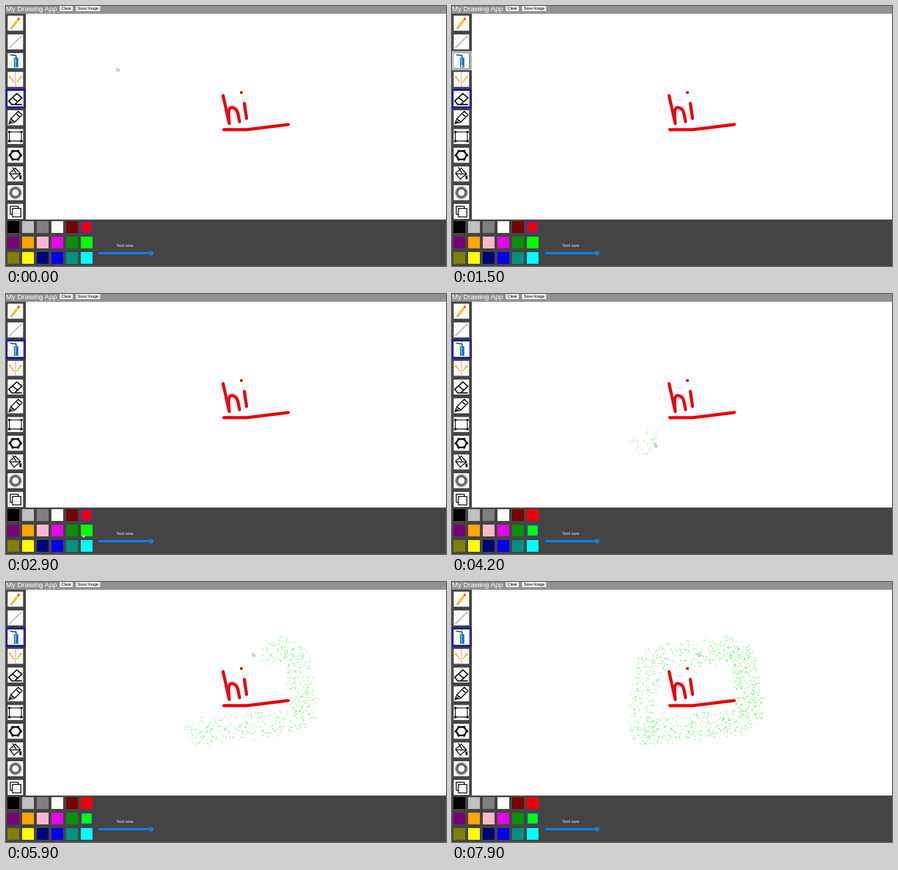
Write an HTML page with a canvas that moves like this. It is 600x354 px and loops after 8000 ms.

```html
<!DOCTYPE html>
<html lang="en">
<head>
<meta charset="utf-8">
<title>Drawing app</title>
<style>
html, body { margin: 0; width: 600px; height: 354px; overflow: hidden; background: #444; }
svg, canvas { position: absolute; left: 0; top: 0; }
text { font-family: "Liberation Sans", Arial, sans-serif; }
</style>
</head>
<body>
<svg width="600" height="354" viewBox="0 0 600 354">
  <rect width="600" height="354" fill="#444"/>
  <rect width="600" height="10.5" fill="#929292"/>
  <rect x="27" y="10.5" width="573" height="280.2" fill="#fff"/>
  <text x="0" y="6.5" font-size="9.55" fill="#fff">My Drawing App</text>
  <g fill="#f0f0f0" stroke="#666" stroke-width=".5">
    <rect x="73" y="-2" width="18.5" height="9.5" rx="1"/>
    <rect x="95" y="-2" width="34" height="9.5" rx="1"/>
  </g>
  <text x="75.8" y="5.2" font-size="5.5">Clear</text>
  <text x="97.8" y="5.2" font-size="5.3">Save Image</text>
  <text x="150.2" y="328" font-size="6" fill="#eee">Tool size</text>
  <path d="M128 336.5H198" stroke="#0b7ff0" stroke-width="3" stroke-linecap="round"/>
  <circle cx="198" cy="336.5" r="3" fill="#0b7ff0"/>
  <path d="M296 122L304.5 160Q301.5 138 308 138Q314 139 316 145L318.5 157.5M325 132.5L328 153M321 117.8h.01M297 168.3H328L385 161.3"
    fill="none" stroke="#e60008" stroke-width="4.2" stroke-linecap="round" stroke-linejoin="round"/>
  <g id="tools"></g>
  <g id="colors"></g>
</svg>
<canvas id="spray" width="600" height="354"></canvas>
<script>
const LOOP = 8000, STEP = 100;
const ERASER = 4, SPRAY = 2, RED = 5, LIME = 11;
const HOVER_AT = 1400, TOOL_AT = 1700, COLOR_AT = 3100, SPRAY_AT = 4100, FASTER_AT = 6700;

// Icons are drawn around (0,0) in a box of about 20 by 20.
const line = (d, w = 1.3, color = '#111', fill = 'none') =>
  `<path d="${d}" fill="${fill}" stroke="${color}" stroke-width="${w}" stroke-linejoin="round"/>`;
const at = (x, y, scale, body) => `<g transform="translate(${x} ${y}) scale(${scale})">${body}</g>`;
const ring = (n, rx, ry, turn = 0) => Array.from({ length: n }, (_, i) => {
  const a = (i + turn) / n * 2 * Math.PI;
  return [rx * Math.cos(a), ry * Math.sin(a)];
});
const polygon = (points, w) => line(`M${points.join('L')}Z`, w) +
  points.map(([x, y]) => `<circle cx="${x}" cy="${y}" r="1.8" fill="#111"/>`).join('');
const pencil = line('M-4 5L4-5', 3.4, '#efc62b') + line('M4-5L5.5-7', 3.4, '#dc5340') + line('M-6 8L-4 5', 1.8, '#b98a58');

const icons = [
  pencil,
  line('M-8 8L8-8', .6),
  line('M1-4V9', 6, '#1674c4') + line('M0-3V8', 1.5, '#7cc0f0') + line('M-7-8L1-7V-4', 1.5, '#25415c'),
  line('M0-10V10', .9, '#f08aa8') + at(5, 0, '.55', pencil) + at(-5, 0, '-.55 .55', pencil),
  line('M-9 3L2-7L9-1L-1 8H-5ZM-4-1.5L3.5 4.5M-5 8H9', 1.7),
  line('M-9 8L-6 1L4-9L9-4L-1 6ZM-6 1L-1 6M1-6L6-1M-9 8L-3 3'),
  polygon(ring(4, 11.6, 8.8, .5), 1.1),
  polygon(ring(6, 7.5, 6.6), 2.4),
  line('M-8-1L0-8L7 0L-2 7ZM-4-9L1-1M-7 0H6') + line('M7 2V7', 3),
  '<circle r="6.8" fill="none" stroke="#555" stroke-width="3.6" stroke-dasharray="1.3 .6"/>' +
    '<circle r="5.6" fill="none" stroke="#555" stroke-width="2"/>',
  line('M-7-7H4V4H-7Z') + line('M-4-4H7.5V7.5H-4Z', 1.3, '#111', '#fff')
];
const palette = ['#000', '#c0c0c0', '#808080', '#fff', '#780000', '#ee0008',
  '#780078', '#ffa500', '#f8b8c8', '#e800f0', '#089008', '#0f0',
  '#808000', '#ff0', '#000078', '#00f', '#088f80', '#0ff'];

// Stops of the pointer before it sprays: time, x, y.
const stops = [[0, 151, 84], [1400, 12, 79], [1800, 12, 79], [2700, 104, 327],
  [COLOR_AT, 105, 327], [3600, 248, 200], [SPRAY_AT, 260, 201]];

function approach(t) {
  const i = Math.max(1, stops.findIndex(s => s[0] >= t));
  const [t0, x0, y0] = stops[i - 1], [t1, x1, y1] = stops[i];
  const u = (t - t0) / (t1 - t0), ease = u * u * (3 - 2 * u);
  return [x0 + (x1 - x0) * ease, y0 + (y1 - y0) * ease];
}

// Counterclockwise round a tilted box that narrows towards the top.
function circuit(t) {
  const degrees = 225 + .123 * (t - SPRAY_AT) + .095 * Math.max(0, t - FASTER_AT);
  const a = degrees * Math.PI / 180;
  const side = v => Math.max(-1, Math.min(1, 1.3 * v));
  const dy = -50 * side(Math.sin(a)), dx = side(Math.cos(a)) * (70 + .15 * dy);
  return [331 + dx, 147 + dy - .12 * dx];
}

const pointer = t => t < SPRAY_AT ? approach(t) : circuit(t);

let seed = 11;
const random = () => (seed = seed * 16807 % 2147483647) / 2147483647;

const dots = [];
for (let t = SPRAY_AT; t < LOOP; t += 3.7) {
  const [x, y] = circuit(Math.max(SPRAY_AT, t - STEP));
  const angle = random() * 2 * Math.PI, r = 19 * random() ** .4;
  dots.push({ t, x: x + r * Math.cos(angle), y: y + r * Math.sin(angle), w: 1 + random() });
}

const toolsEl = document.getElementById('tools'), colorsEl = document.getElementById('colors');
const ctx = document.getElementById('spray').getContext('2d');

function drawTools(selected, hovered) {
  toolsEl.innerHTML = icons.map((icon, i) => {
    const y = 23.4 + 25.5 * i + (i > selected ? 1.3 : i === selected ? .7 : 0);
    const frame = i === selected ? '#1010b8' : i === hovered ? '#c8c8c8' : '';
    return at(12.8, y, 1,
      (frame && `<rect x="-12" y="-12" width="25" height="24" fill="#777" stroke="${frame}" stroke-width="2"/>`) +
      `<rect x="-10.5" y="-10.2" width="21" height="20.4" fill="#fff"/>${icon}`);
  }).join('');
}

function drawColors(selected) {
  colorsEl.innerHTML = palette.map((fill, i) => {
    const inset = i === selected ? .6 : 0, size = 16 - 2 * inset;
    const x = 2 + 20 * (i % 6) + inset, y = 293 + 21 * Math.floor(i / 6) + inset;
    const edge = inset && 'stroke="#3038d0" stroke-width="1.2"';
    return `<rect x="${x}" y="${y}" width="${size}" height="${size}" fill="${fill}" ${edge || ''}/>`;
  }).join('');
}

function drawPointer(x, y) {
  ctx.beginPath();
  [[0, 0], [0, 5], [1.5, 3.8], [3, 5.2], [2.4, 3.6], [3.8, 3.5]]
    .forEach(([dx, dy]) => ctx.lineTo(x + dx, y + dy));
  ctx.closePath();
  ctx.fillStyle = '#fff';
  ctx.strokeStyle = '#777';
  ctx.lineWidth = .6;
  ctx.fill();
  ctx.stroke();
}

let lastState = '';
function render(now) {
  const t = Math.floor(now % LOOP / STEP) * STEP;
  const tool = t < TOOL_AT ? ERASER : SPRAY;
  const hovered = t >= HOVER_AT && t < TOOL_AT ? SPRAY : -1;
  const color = t < COLOR_AT ? RED : LIME;
  const state = [tool, hovered, color].join();
  if (state !== lastState) {
    drawTools(tool, hovered);
    drawColors(color);
    lastState = state;
  }
  ctx.clearRect(0, 0, 600, 354);
  ctx.fillStyle = '#5cf060';
  for (const d of dots) if (d.t < t) ctx.fillRect(d.x, d.y, d.w, .9);
  drawPointer(...pointer(t));
}

const start = performance.now();
function tick() {
  render(performance.now() - start);
  requestAnimationFrame(tick);
}
tick();
</script>
</body>
</html>
```
